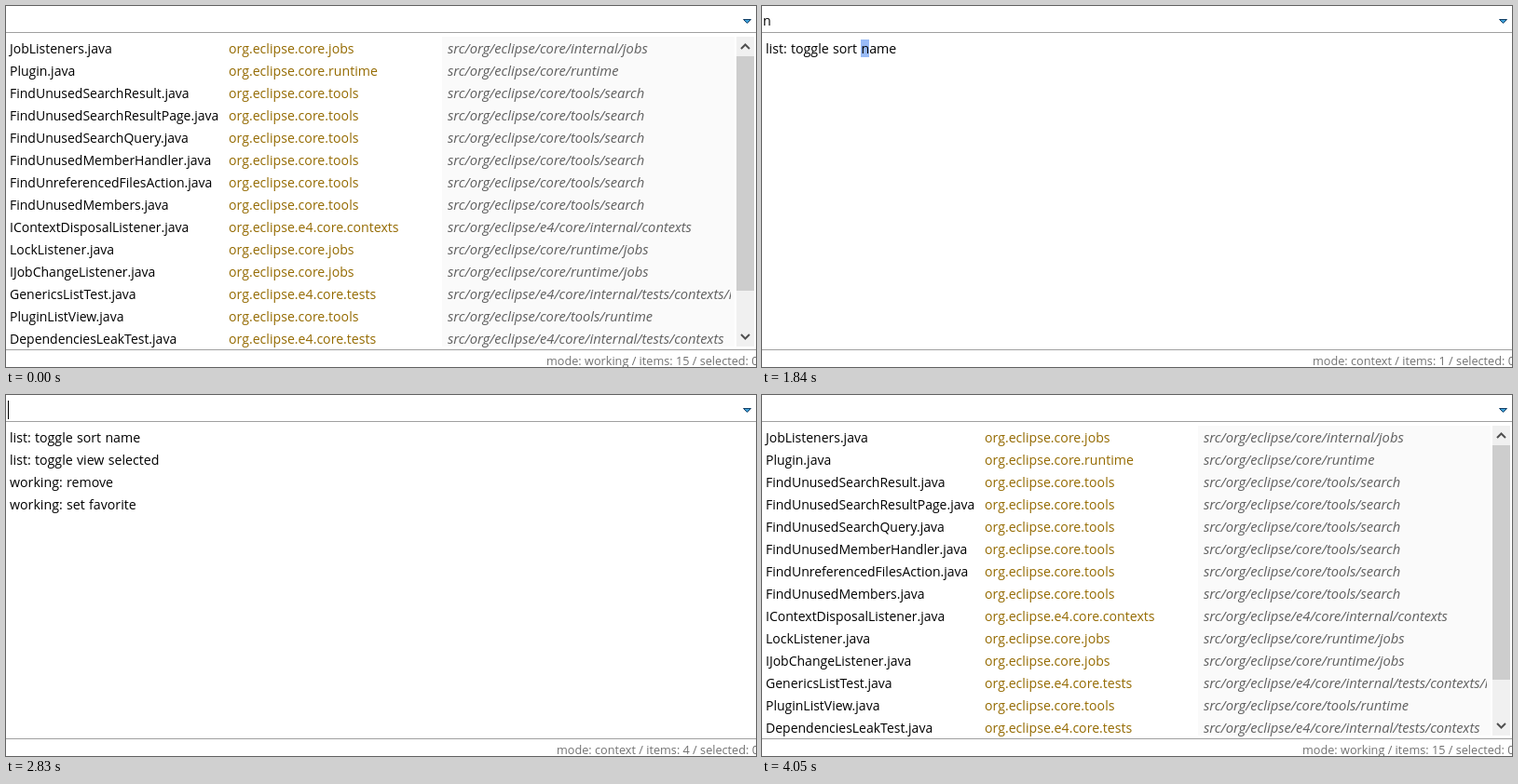
Write an HTML page that moves like this. It is 805 px wide and 388 px high and loops after 4250 ms.

```html
<!DOCTYPE html>
<html lang="en">
<head>
<meta charset="utf-8">
<title>Quick list</title>
<style>
  html, body { margin: 0; width: 100%; height: 100%; overflow: hidden; background: #fff; }
  body { position: relative; font: 14px/24px "Open Sans", "Noto Sans", sans-serif; color: #000; white-space: pre; }
  body > *, .row > * { position: absolute; }
  .rule { left: 0; width: 805px; height: 1px; background: #a0a0a0; }
  #query { left: 1px; top: 4px; font-size: 14.2px; }
  #caret { top: 6px; width: 1px; height: 20px; background: #000; }
  #shade { left: 468px; top: 33px; width: 314px; height: 333px; background: #fafafa; }
  #list { left: 0; top: 34px; width: 778px; height: 335px; overflow: hidden; }
  .row { position: relative; height: 24px; }
  .name { left: 4px; }
  .package { left: 239px; color: #946a00; font-size: 14.15px; }
  .path { left: 474px; top: -1px; color: #606060; font-size: 14.77px; font-style: italic; }
  .command { left: 4px; font-size: 14.2px; word-spacing: .6px; }
  mark { background: #99bbf7; color: inherit; }
  #status { top: 369px; font-size: 12.7px; color: #717171; }
  svg { left: 0; top: 0; }
</style>
</head>
<body>
<div id="shade"></div>
<div id="list"></div>
<div id="query"></div>
<div id="caret"></div>
<div class="rule" style="top:28px"></div>
<div class="rule" style="top:369px"></div>
<div id="status"></div>
<svg width="805" height="388">
  <path d="M791.5 14.5H799.5L795.5 18.5Z" fill="#3f9fd6" stroke="#123f66"/>
  <g id="scrollbar">
    <path d="M784 33h19v333h-19z" fill="#f0f0f0"/>
    <path d="M784 54h19v252h-19z" fill="#cdcdcd"/>
    <path d="M789 46l4.5-4.5 4.5 4.5M789 353l4.5 4.5 4.5-4.5" fill="none" stroke="#505050" stroke-width="2"/>
  </g>
</svg>
<script>
const $ = id => document.getElementById(id);

const files = [
  ["JobListeners", "core.jobs", "core/internal/jobs"],
  ["Plugin", "core.runtime", "core/runtime"],
  ["FindUnusedSearchResult", "core.tools", "core/tools/search"],
  ["FindUnusedSearchResultPage", "core.tools", "core/tools/search"],
  ["FindUnusedSearchQuery", "core.tools", "core/tools/search"],
  ["FindUnusedMemberHandler", "core.tools", "core/tools/search"],
  ["FindUnreferencedFilesAction", "core.tools", "core/tools/search"],
  ["FindUnusedMembers", "core.tools", "core/tools/search"],
  ["IContextDisposalListener", "e4.core.contexts", "e4/core/internal/contexts"],
  ["LockListener", "core.jobs", "core/runtime/jobs"],
  ["IJobChangeListener", "core.jobs", "core/runtime/jobs"],
  ["GenericsListTest", "e4.core.tests", "e4/core/internal/tests/contexts/inject"],
  ["PluginListView", "core.tools", "core/tools/runtime"],
  ["DependenciesLeakTest", "e4.core.tests", "e4/core/internal/tests/contexts"]
].map(([name, pkg, path]) => [name + ".java", "org.eclipse." + pkg, "src/org/eclipse/" + path]);

const sortKey = file => file[0].toLowerCase();
const sorted = [...files].sort((a, b) => sortKey(a) < sortKey(b) ? -1 : 1);

const row = cells => `<div class="row">${cells}</div>`;
const cell = (type, text) => `<span class="${type}">${text}</span>`;
const fileRows = list => list.map(([name, pkg, path]) =>
  row(cell("name", name) + cell("package", pkg) + cell("path", path))).join("");
const commandRows = list => list.map(text => row(cell("command", text))).join("");

const working = list => ({ rows: fileRows(list), mode: "working", count: 15, statusX: 580 });
const context = list => ({ rows: commandRows(list), mode: "context", count: list.length, statusX: 591 });

const views = {
  recent: working(files),
  byName: working(sorted),
  commands: context(["list: toggle sort name", "list: toggle view selected", "working: remove", "working: set favorite"]),
  match: context(["list: toggle sort <mark>n</mark>ame"])
};

// start ms, view, typed text, caret shown, scrollbar shown
const steps = [
  [0, "recent", "", false, true],
  [400, "recent", "", true, true],
  [800, "commands", "", true, false],
  [1220, "commands", "", false, false],
  [1420, "match", "n", true, false],
  [1840, "match", "n", false, false],
  [2040, "byName", "", true, true],
  [2630, "byName", "", false, true],
  [2830, "commands", "", true, false],
  [3030, "match", "n", true, false],
  [3430, "match", "", true, true],
  [3630, "recent", "", true, true],
  [4050, "recent", "", false, true]
];
const LOOP = 4250;

function show([, viewName, query, caret, scrollbar]) {
  const view = views[viewName];
  $("list").innerHTML = view.rows;
  $("shade").hidden = view.mode !== "working";
  $("query").textContent = query;
  $("caret").hidden = !caret;
  $("caret").style.left = (query ? 10 : 2) + "px";
  $("scrollbar").style.display = scrollbar ? "" : "none";
  $("status").textContent = `mode: ${view.mode} / items: ${view.count} / selected: 0`;
  $("status").style.left = view.statusX + "px";
}

const start = performance.now();
let current;
function tick() {
  const time = (performance.now() - start) % LOOP;
  const step = steps.findLast(([from]) => from <= time);
  if (step !== current) show(current = step);
  requestAnimationFrame(tick);
}
tick();
</script>
</body>
</html>
```
